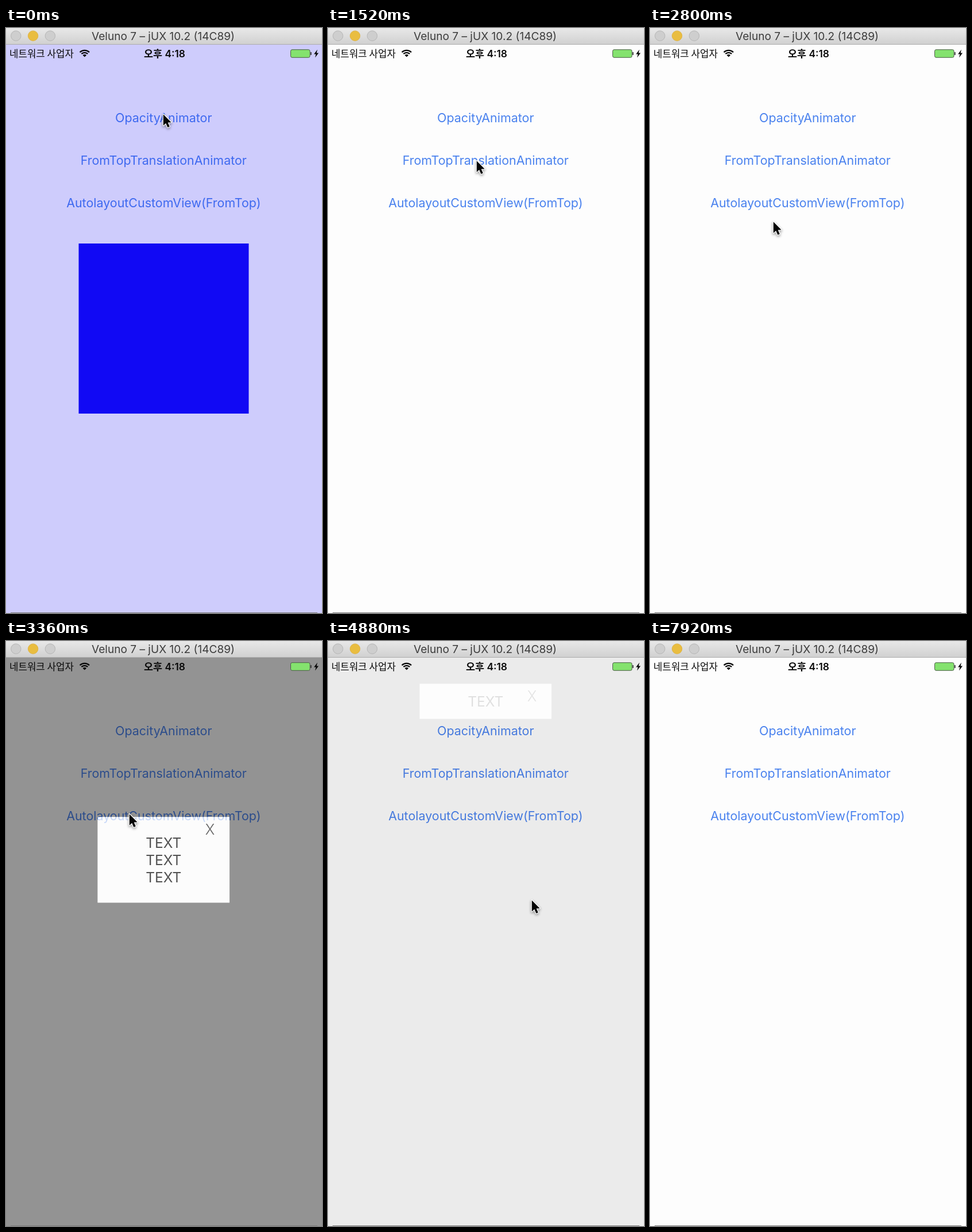
Recreate the animation shown at these times as an HTML page with a canvas. Size 550 px wide and 1018 px high, loop 8000 ms.

```html
<!DOCTYPE html>
<html lang="ko">
<head>
<meta charset="utf-8">
<title>Animators</title>
<style>
html, body { margin: 0; width: 100%; height: 100%; overflow: hidden; background: #fdfdfd; }
canvas { display: block; width: 550px; height: 1018px; }
</style>
</head>
<body>
<canvas id="stage" width="550" height="1018"></canvas>
<script>
const W = 550, H = 1018, LOOP = 8000, BAR = 29, MID = 274.3;
const ENTER = 300, LEAVE = 200, TRAVEL = 400;
const ctx = document.getElementById('stage').getContext('2d');
const LATIN = 'Inter, "Noto Sans CJK KR", "Noto Sans CJK", sans-serif';
const HANGUL = '"Noto Sans CJK KR", "Noto Sans CJK", sans-serif';
const BLUE = '#1109f4';

// Pointer stops: each is approached from `from` on, for TRAVEL ms
const STOPS = [
  { from: -TRAVEL, x: 273, y: 149 },
  { from: 40, x: 270, y: 492 },
  { from: 1080, x: 258, y: 230 },
  { from: 1540, x: 258, y: 414 },
  { from: 2400, x: 214, y: 336 },
  { from: 2800, x: 214, y: 300 },
  { from: 3600, x: 332, y: 490 },
  { from: 4080, x: 354, y: 450 },
  { from: 5000, x: 372, y: -40 }
];

const clamp = v => Math.min(1, Math.max(0, v));
const smooth = v => { v = clamp(v); return v * v * (3 - 2 * v); };
const mix = (a, b, p) => a + (b - a) * p;

// 0 hidden, 1 shown
const shown = (t, enter, leave) =>
  smooth((t - enter) / ENTER) * (1 - smooth((t - leave) / LEAVE));

function text(str, x, y, font, color, align = 'center') {
  ctx.font = font;
  ctx.fillStyle = color;
  ctx.textAlign = align;
  ctx.fillText(str, x, y);
}

function rect(x, y, w, h, color) {
  ctx.fillStyle = color;
  ctx.fillRect(x, y, w, h);
}

function polygon(points) {
  ctx.beginPath();
  points.forEach(([x, y]) => ctx.lineTo(x, y));
  ctx.closePath();
}

function withAlpha(a, draw) {
  if (a <= 0) return;
  ctx.save();
  ctx.globalAlpha = a;
  draw();
  ctx.restore();
}

function drawPage() {
  rect(0, BAR, W, H - BAR, '#fdfdfd');
  ['OpacityAnimator', 'FromTopTranslationAnimator', 'AutolayoutCustomView(FromTop)']
    .forEach((s, i) => text(s, MID, 163.6 + i * 74, '21.45px ' + LATIN, '#4a82ee'));
}

// The tint fades with p; the square takes its own opacity and height
function drawSquare(p, alpha, y) {
  withAlpha(p * 0.2, () => rect(0, BAR, W, H - BAR, BLUE));
  withAlpha(alpha, () => rect(126.5, y, 296, 296, BLUE));
}

function drawPopup(p) {
  if (p <= 0) return;
  const w = 229.5, x = MID - w / 2, y = mix(27, 426, p), h = mix(43, 194.5, p);
  withAlpha(p * 0.6, () => {
    ctx.fillStyle = '#000';
    ctx.beginPath();
    ctx.rect(0, BAR, W, H - BAR);
    ctx.rect(x, y, w, h);
    ctx.fill('evenodd');
  });
  withAlpha(p, () => {
    rect(x, y, w, h, '#fdfdfd');
    const count = Math.max(1, Math.floor((h - 44) / 30));
    const top = y + h / 2 - (count - 1) * 15 + 9.5;
    for (let i = 0; i < count; i++) {
      text('TEXT'.repeat(i === 3 ? 3 : 1), MID, top + i * 30, '24.5px ' + LATIN, '#080808');
    }
    text('X', 355, y + 31, '300 25px ' + LATIN, '#222');
  });
}

function drawWifi(x, y) {
  const from = -Math.PI * 0.75, to = -Math.PI * 0.25;
  ctx.strokeStyle = ctx.fillStyle = '#050505';
  ctx.lineWidth = 2.3;
  for (const r of [11.6, 7.7]) {
    ctx.beginPath();
    ctx.arc(x, y, r, from, to);
    ctx.stroke();
  }
  ctx.beginPath();
  ctx.moveTo(x, y);
  ctx.arc(x, y, 4.6, from, to);
  ctx.fill();
}

function drawBattery(x, y, w, h) {
  ctx.beginPath();
  ctx.roundRect(x, y, w, h, 2.5);
  ctx.fillStyle = '#84e26e';
  ctx.fill();
  ctx.strokeStyle = '#4c5c48';
  ctx.lineWidth = 1;
  ctx.stroke();
  rect(x + w + 0.8, y + h / 2 - 2.5, 1.8, 5, '#333');
}

function drawBolt(x, y) {
  const half = [[2, -7], [-4, 1], [-0.6, 1]];
  polygon([...half, ...half.map(p => p.map(v => -v))].map(([a, b]) => [x + a, y + b]));
  ctx.fillStyle = '#080808';
  ctx.fill();
}

function drawStatus() {
  text('네트워크 사업자', 6, 50.5, '16.8px ' + HANGUL, '#0a0a0a', 'left');
  drawWifi(136.8, 50.5);
  text('오후 4:18', 276, 50.8, '600 17.4px ' + LATIN, '#0a0a0a');
  drawBattery(495.5, 37.7, 33.5, 13.6);
  drawBolt(540, 44.6);
}

function drawTitleBar() {
  const fill = ctx.createLinearGradient(0, 0, 0, BAR);
  fill.addColorStop(0, '#e8e8e8');
  fill.addColorStop(1, '#d0d0d0');
  rect(0, 0, W, BAR, fill);
  rect(0, BAR - 1, W, 1, '#adadad');

  for (let i = 0; i < 3; i++) {
    ctx.beginPath();
    ctx.arc(17.3 + i * 29.8, 13.6, 8.7, 0, Math.PI * 2);
    ctx.fillStyle = i === 1 ? '#e9bd40' : '#cecece';
    ctx.strokeStyle = i === 1 ? '#dfb345' : '#b5b5b5';
    ctx.lineWidth = 1;
    ctx.fill();
    ctx.stroke();
  }
  text('Veluno 7 – jUX 10.2 (14C89)', 273.5, 20.8, '19.1px ' + LATIN, '#3c3c3c');
}

function pointerAt(t) {
  return STOPS.reduce((at, { from, x, y }) => {
    const p = smooth((t - from) / TRAVEL);
    return { x: mix(at.x, x, p), y: mix(at.y, y, p) };
  }, STOPS[0]);
}

function drawPointer(t) {
  const { x, y } = pointerAt(t);
  ctx.save();
  ctx.translate(x + 0.8, y + 1.2);
  polygon([[0, 0], [0, 19.5], [4.4, 15.6], [7.6, 22.8], [11, 21.3], [7.9, 14.2], [13.8, 14]]);
  ctx.lineJoin = 'round';
  ctx.lineWidth = 2.4;
  ctx.strokeStyle = '#fff';
  ctx.shadowColor = 'rgba(0,0,0,.45)';
  ctx.shadowBlur = 4;
  ctx.shadowOffsetY = 2;
  ctx.stroke();
  ctx.shadowColor = 'transparent';
  ctx.fillStyle = '#050505';
  ctx.fill();
  ctx.restore();
}

function draw(t) {
  const fade = 1 - smooth((t - 680) / ENTER);
  const slide = shown(t, 1553, 2445);
  drawPage();
  drawSquare(fade, fade, 375);
  drawSquare(slide, 1, mix(-267, 375, slide));
  drawPopup(shown(t, 3170, 4724));
  drawStatus();
  drawTitleBar();
  rect(8, H - 1, W - 16, 1, '#7c7c7c');
  drawPointer(t);
}

function tick() {
  draw(performance.now() % LOOP);
  requestAnimationFrame(tick);
}
tick();
</script>
</body>
</html>
```
